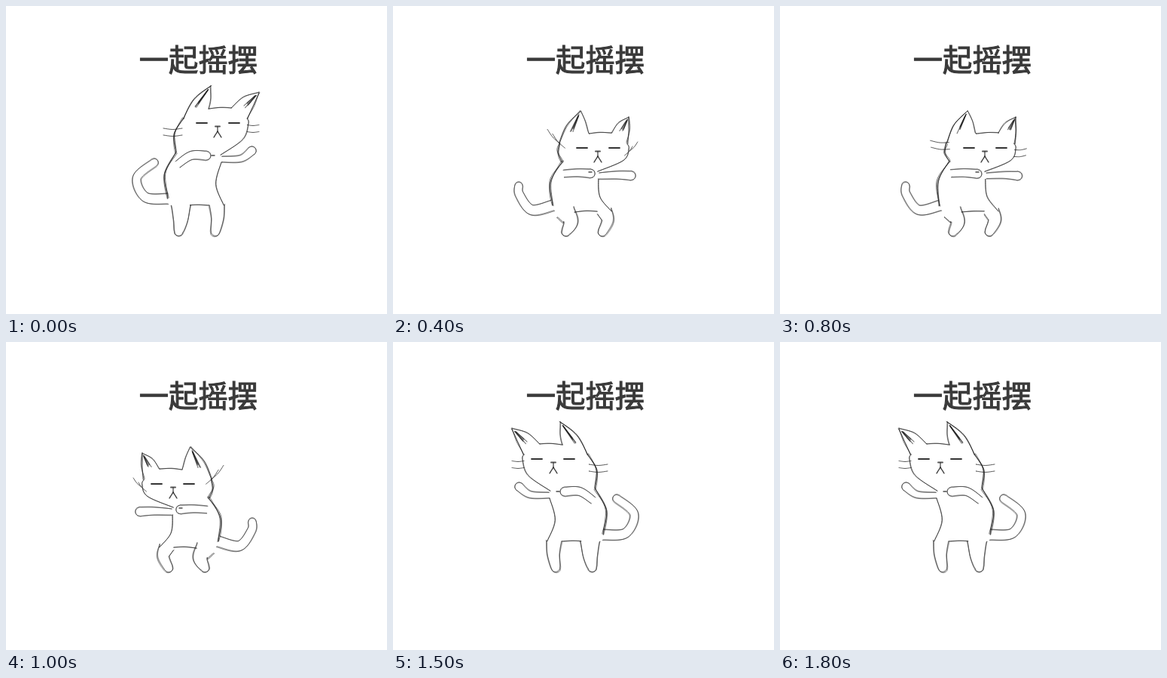
An HTML page with a canvas for the animation above (1850 ms loop, 506 px wide and 408 px high).

```html
<!DOCTYPE html>
<html lang="zh-CN">
<head>
<meta charset="utf-8">
<title>一起摇摆</title>
<style>
  html, body { margin: 0; width: 100%; height: 100%; overflow: hidden; background: #fff; }
  canvas, svg { position: absolute; left: 0; top: 0; display: block; }
  text {
    font: 400 39.3px "Noto Sans CJK SC", "Noto Sans CJK", sans-serif;
    fill: #3a3a3a; stroke: #3a3a3a; stroke-width: 1.1px;
  }
</style>
</head>
<body>
<canvas id="stage" width="506" height="408"></canvas>
<svg width="506" height="408"><text x="176.8" y="85.5">一起摇摆</text></svg>
<script>
const ctx = document.getElementById('stage').getContext('2d');
const LOOP = 1850, STEP = 50, TURN = 18, MIRROR = 494;

// Joints of the key poses; everything else is built from them.
const stand = {
  nose: [281, 160], chin: [285, 197], shoulder: [226, 194], lean: 7, lift: 0,
  armL: [[246, 198], [266, 198]], armR: [[312, 202], [326, 192]],
  tail: [[185, 253], [174, 228], [197, 208]],
  hips: [[232, 264], [280, 264]], knees: [[232, 284], [281, 281]]
};
const low = {
  nose: [272, 193], chin: [272, 219], shoulder: [225, 206], lean: -7, lift: .85,
  armL: [[245, 221], [262, 222]], armR: [[298, 224], [316, 225]],
  tail: [[184, 270], [168, 250], [167, 239]],
  hips: [[229, 273], [281, 272]], knees: [[236, 286], [285, 284]]
};
const crouch = {
  nose: [269, 199], chin: [275, 222], shoulder: [222, 209], lean: 0, lift: 0,
  armL: [[238, 226], [249, 223]], armR: [[298, 232], [313, 228]],
  tail: [[178, 271], [164, 250], [168, 238]],
  hips: [[230, 274], [280, 275]], knees: [[240, 286], [289, 285]]
};
const ankles = [[230, 299], [278, 299]];

const mix = (a, b, t) => Array.isArray(a) ? a.map((v, i) => mix(v, b[i], t)) : a + (b - a) * t;
const blend = (a, b, t) => Object.fromEntries(Object.keys(a).map(k => [k, mix(a[k], b[k], t)]));
const add = ([x, y], dx, dy) => [x + dx, y + dy];

const half = blend(stand, low, .5);
const bounce = [stand, half, low, crouch, { ...low, lift: .1 }, half];

let seed;
function random() {
  const v = Math.sin(++seed * 12.9898) * 43758.5453;
  return v - Math.floor(v);
}

// Catmull-Rom curve as a dense list of points
function smooth(pts, per = 8) {
  const at = i => pts[Math.max(0, Math.min(pts.length - 1, i))];
  const out = [];
  for (let s = 0; s <= (pts.length - 1) * per; s++) {
    const i = Math.floor(s / per), t = s / per - i;
    const [a, b, c, d] = [at(i - 1), at(i), at(i + 1), at(i + 2)];
    out.push(b.map((v, k) => v + t / 2 * (c[k] - a[k]
      + t * (2 * a[k] - 5 * v + 4 * c[k] - d[k] + t * (3 * (v - c[k]) + d[k] - a[k])))));
  }
  return out;
}

// Several loose pencil passes over one line
function pencil(pts, passes = 2, loose = .7, width = 1, alpha = .62) {
  const line = smooth(pts);
  ctx.lineWidth = width;
  ctx.strokeStyle = `rgba(30,30,30,${alpha})`;
  for (let n = 0; n < passes; n++) {
    const amp = n ? loose : 0, px = random() * 6, py = random() * 6;
    ctx.beginPath();
    line.forEach(([x, y], i) => {
      const u = i / line.length * 5;
      ctx.lineTo(x + amp * Math.sin(px + u), y + amp * Math.sin(py + u));
    });
    ctx.stroke();
  }
}

// Line from a to b, bulging sideways by a share of its length
function bow(a, b, k, ...style) {
  const [mx, my] = mix(a, b, .5);
  pencil([a, [mx - k * (b[1] - a[1]), my + k * (b[0] - a[0])], b], ...style);
}

// Outline of a limb: open at its root, round at its end
function limb(pts, r0, r1, ...style) {
  const mid = smooth(pts), last = mid.length - 1, left = [], right = [];
  let angle;
  mid.forEach((p, i) => {
    const a = mid[Math.max(0, i - 1)], b = mid[Math.min(last, i + 1)];
    angle = Math.atan2(b[1] - a[1], b[0] - a[0]);
    const r = mix(r0, r1, i / last), nx = -Math.sin(angle) * r, ny = Math.cos(angle) * r;
    left.push(add(p, nx, ny));
    right.unshift(add(p, -nx, -ny));
  });
  const cap = [1, 0, -1].map(k =>
    add(mid[last], r1 * Math.cos(angle + k * .8), r1 * Math.sin(angle + k * .8)));
  pencil([...left, ...cap, ...right], ...style);
}

function ear(tip, outer, inner, shade, bend) {
  bow(outer, tip, bend[0], 3, 1);
  bow(inner, tip, bend[1], 2, .8);
  for (let i = 0; i < 6; i++) {
    const foot = mix(outer, inner, shade + random() * .3);
    pencil([mix(tip, foot, .1 + random() * .1), mix(tip, foot, .5 + random() * .25)], 1, 0, 1.1);
  }
}

function whiskers(root, side, length, lift) {
  const dx = side * Math.cos(lift), dy = -Math.sin(lift);
  for (const off of [-4.5, 4.5]) {
    const a = add(root, dy * off * side, dx * off * side);
    bow(a, add(a, dx * length, dy * length), side * .06, 1, 0, 1, .75);
  }
}

function head({ nose, chin, shoulder, lean, lift }) {
  const at = (x, y) => add(nose, x, y), depth = chin[1] - nose[1];
  const outL = at(-48 + lean * .4, -11), inL = at(-12, -24), inR = at(18, -25), outR = at(39, -11);
  ear(at(-16 + lean, -54), outL, inL, .12, [-.1, .05]);
  ear(at(48 + lean, -46), outR, inR, .4, [.05, -.1]);
  bow(inL, inR, -.03, 2, .4);
  pencil([outR, at(41, -4), at(34, depth * .45), chin], 2, .6);
  bow(outL, shoulder, .18, 4, 1.3);
  for (const x of [-21, 22]) bow(at(x - 7, -5), at(x + 7, -5), 0, 1, 0, 1.8, .9);
  pencil([at(-3, -.5), at(3, -.5)], 1, 0, 2, .75);
  pencil([nose, at(0, 6)], 1, 0, 1.3, .8);
  for (const x of [-5, 5]) pencil([at(0, 6), at(x, 14)], 1, 0, 1.4, .85);
  whiskers(at(-47, 1.3 * (depth - 32)), -1, 25, lift);
  whiskers(at(39, 2), 1, 16, lift);
}

function body({ chin, shoulder, armL, armR, tail, hips, knees }) {
  const chest = add(chin, 1, 10), rump = add(hips[0], -17, -9);
  limb([rump, ...tail], 7, 5.5, 2, .9);
  bow(shoulder, rump, .16, 4, 1.2);
  bow(chest, add(hips[1], 9, 0), .15, 2, .5);
  bow(add(hips[0], 12, 0), add(hips[1], -10, 0), -.03, 2, .4);
  hips.forEach((hip, i) => limb([hip, knees[i], ankles[i]], 13 - i * 3, 6, 3, .8, 1, .5));
  limb([add(shoulder, 2, 16), ...armL], 5, 6, 2, .7);
  limb([add(chest, 1, -4), ...armR], 4, 6, 2, .7);
  bow(add(chin, -12, 1), add(chin, -8, 1), 0, 1, 0, 1.4, .8);
}

function draw(step) {
  const pose = bounce[step % bounce.length];
  seed = step % bounce.length * 200;
  ctx.setTransform(1, 0, 0, 1, 0, 0);
  ctx.clearRect(0, 0, 506, 408);
  if (step >= TURN) ctx.setTransform(-1, 0, 0, 1, MIRROR, 0);
  ctx.lineCap = ctx.lineJoin = 'round';
  body(pose);
  head(pose);
}

let shown = 0;
const start = performance.now();
function tick() {
  const step = Math.floor((Math.max(0, performance.now() - start) % LOOP) / STEP);
  if (step !== shown) draw(shown = step);
  requestAnimationFrame(tick);
}
draw(0);
tick();
</script>
</body>
</html>
```
